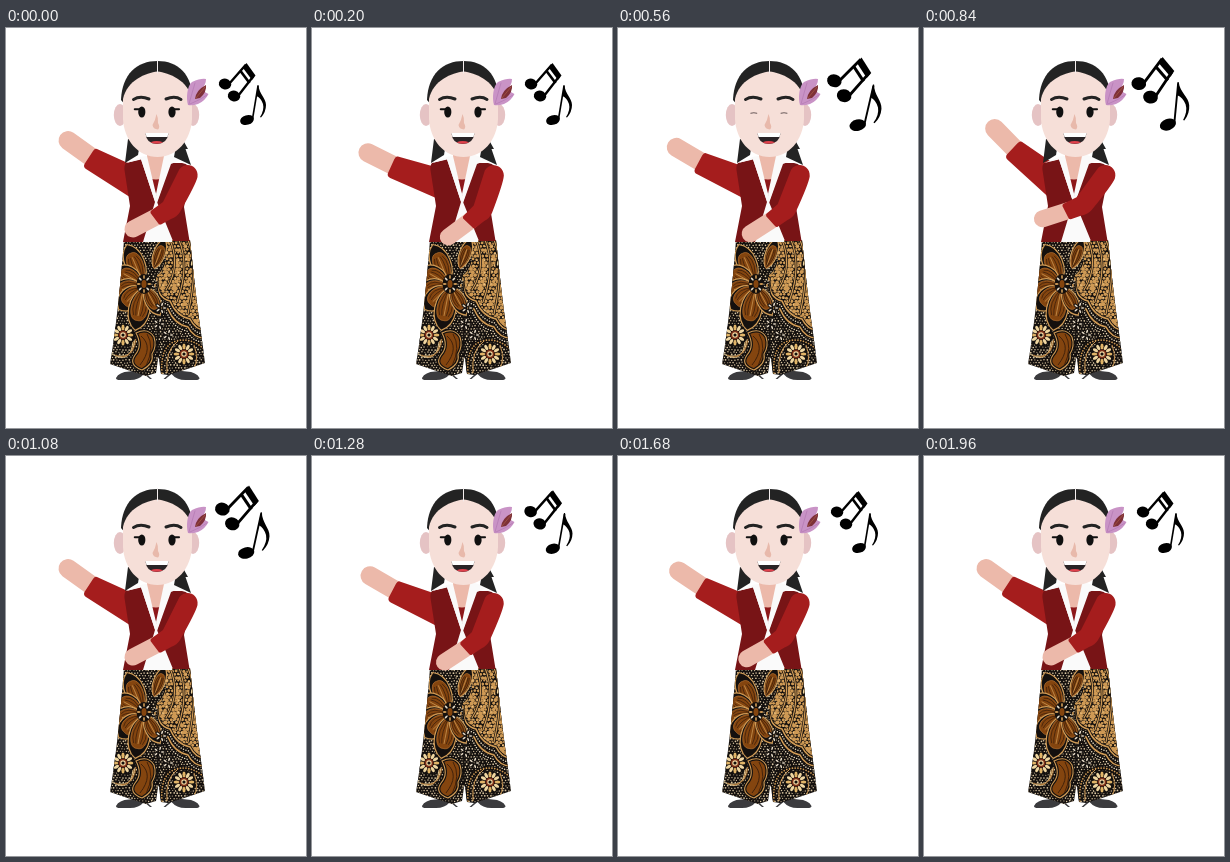
An HTML page with a canvas for the animation above (2000 ms loop, 300 by 400 pixels).

```html
<!DOCTYPE html>
<html lang="en">
<head>
<meta charset="utf-8">
<title>Dancer</title>
<style>
html, body { margin: 0; width: 100%; height: 100%; overflow: hidden; background: #fff; }
canvas { display: block; width: 300px; height: 400px; }
</style>
</head>
<body>
<canvas id="stage"></canvas>
<script>
const W = 300, H = 400, LOOP = 2000;
const INK = '#232323', SKIN = '#ecb9aa', FACE = '#f6dfd8', EAR = '#e5c3c4';
const RED = '#a51d1d', WINE = '#781416', GOLD = '#cf9a55', CREAM = '#f0d6a0';
const BROWN = '#84450f', NIGHT = '#14100e';
const dpr = window.devicePixelRatio || 1;

function setup(canvas) {
  canvas.width = W * dpr;
  canvas.height = H * dpr;
  const g = canvas.getContext('2d');
  g.scale(dpr, dpr);
  return g;
}
const ctx = setup(document.getElementById('stage'));

function shape(g, d, fill, line, width = 1) {
  const p = new Path2D(d);
  if (fill) { g.fillStyle = fill; g.fill(p); }
  if (line) { g.strokeStyle = line; g.lineWidth = width; g.stroke(p); }
}
function oval(g, x, y, rx, ry, fill, turn = 0) {
  g.beginPath();
  g.ellipse(x, y, rx, ry, turn, 0, 7);
  g.fillStyle = fill;
  g.fill();
}
function capsule(g, x1, y1, x2, y2, r, color) {
  g.lineCap = 'round';
  shape(g, `M${x1} ${y1}L${x2} ${y2}`, null, color, r * 2);
}
function turned(g, x, y, deg, scale, draw) {
  g.save();
  g.translate(x, y);
  g.rotate(deg * Math.PI / 180);
  g.scale(scale, scale);
  g.translate(-x, -y);
  draw(g);
  g.restore();
}

// Keys are [time, value] pairs joined by a sine ease.
function track(keys, t) {
  for (let i = 1; i < keys.length; i++) {
    const [t0, a] = keys[i - 1], [t1, b] = keys[i];
    if (t <= t1) return a + (b - a) * (1 - Math.cos(Math.PI * (t - t0) / (t1 - t0))) / 2;
  }
  return keys[keys.length - 1][1];
}
const SWING = [[0, 0], [360, -15.3], [820, 9.9], [1260, -5.5], [1960, 0], [LOOP, 0]];
const SIZE = [[0, 1], [200, 1], [560, 1.19], [1040, 1.19], [1360, 1], [LOOP, 1]];
const TILT = [[0, 0], [200, 0], [520, 4], [840, -4], [1100, 3], [1360, 0], [LOOP, 0]];

// ---- patterned cloth ----
function random(seed) {
  return () => (seed = seed * 16807 % 2147483647) / 2147483647;
}
function dots(g, step, r, color, jitter, seed) {
  const rnd = random(seed);
  g.fillStyle = color;
  for (let y = 212, row = 0; y < 352; y += step * 0.87, row++) {
    for (let x = 102 + row % 2 * step / 2; x < 202; x += step) {
      g.beginPath();
      g.arc(x + (rnd() - 0.5) * jitter, y + (rnd() - 0.5) * jitter, r * (0.7 + rnd() * 0.6), 0, 7);
      g.fill();
    }
  }
}
function beads(g, d, color, size = 1.5, gap = 2.6) {
  shape(g, d, null, NIGHT, size + 2);
  g.save();
  g.lineCap = 'round';
  g.setLineDash([0.01, gap]);
  shape(g, d, null, color, size);
  g.restore();
}
function leaf(g, x, y, deg, len, wide) {
  g.save();
  g.translate(x, y);
  g.rotate(deg * Math.PI / 180);
  const d = k => `M3 0C${len * 0.3} ${-wide * k} ${len * 0.9} ${-wide * k} ${len * k} 0` +
    `C${len * 0.9} ${wide * k} ${len * 0.3} ${wide * k} 3 0`;
  shape(g, d(1.1), NIGHT, GOLD, 1.2);
  shape(g, d(0.86), BROWN, '#b87332', 0.6);
  for (let k = -2; k <= 2; k++) {
    shape(g, `M4 0Q${len * 0.5} ${k * wide * 0.4} ${len * 0.75} ${k * wide * 0.17}`, null, k ? '#3a1e0b' : GOLD, 0.7);
  }
  g.restore();
}
function bloom(g, x, y, r) {
  oval(g, x, y, r + 1, r + 1, NIGHT);
  for (let i = 0; i < 12; i++) {
    const a = i * Math.PI / 6;
    oval(g, x + Math.cos(a) * r * 0.72, y + Math.sin(a) * r * 0.72, r * 0.27, r * 0.15, i % 3 ? CREAM : '#e2b568', a);
  }
  oval(g, x, y, r * 0.43, r * 0.43, '#7a2f18');
  oval(g, x, y, r * 0.26, r * 0.26, CREAM);
  oval(g, x, y, r * 0.15, r * 0.15, NIGHT);
}
function lobe(g, d) {
  shape(g, d, BROWN, NIGHT, 3.4);
  shape(g, d, null, GOLD, 1.1);
}
function sprig(g, x, y) {
  for (let i = 0; i < 5; i++) {
    const a = i * 1.257, px = x + Math.cos(a) * 3.6, py = y + Math.sin(a) * 3.6;
    oval(g, px, py, 2.8, 1.7, NIGHT, a);
    oval(g, px, py, 1.8, 0.8, '#e8dcc8', a);
  }
}
function cloth() {
  const c = document.createElement('canvas'), g = setup(c);
  g.clip(new Path2D('M118 212H184C187 240 190 270 195 305L199 335Q182 341 162 347L155 346' +
    'L152.500 328L150 345L140 348Q121 342 104 336C111 295 115 250 118 212Z'));
  g.fillStyle = NIGHT;
  g.fillRect(0, 0, W, H);
  dots(g, 3, 0.72, '#d8c4a0', 1, 17);

  // pebbled field with strands along its lower edge
  const edge = 'C163 239 160 226 158 210H192L202 302Q190 303 184 291Q170 288 165 273Q149 270 150 248';
  g.save();
  shape(g, 'M150 248' + edge, NIGHT);
  g.clip(new Path2D('M150 248' + edge));
  dots(g, 3.7, 1.65, GOLD, 1.1, 31);
  dots(g, 7.4, 0.7, '#ecc88c', 2, 53);
  for (let i = 0; i < 3; i++) {
    shape(g, `M${164 + i * 9} 212Q${175 + i * 9} 238 ${160 + i * 11} ${262 + i * 12}`, null, NIGHT, 2.6);
    shape(g, `M${164 + i * 9} 212Q${175 + i * 9} 238 ${160 + i * 11} ${262 + i * 12}`, null, GOLD, 1.2);
  }
  g.restore();
  for (let i = 0; i < 4; i++) {
    const d = `M${151 - i} ${250 + i * 3}Q${150 - i} ${270 + i * 4} ${164 - i} ${273 + i * 4}` +
      `Q${170 - i} ${288 + i * 4} ${184 - i} ${291 + i * 4}Q${190 - i} ${303 + i * 4} 201 ${302 + i * 4}`;
    if (i % 2) beads(g, d, '#eadcc0');
    else { shape(g, d, null, NIGHT, 3.2); shape(g, d, null, GOLD, 1.6); }
  }
  oval(g, 186, 235, 2.5, 5, NIGHT, 0.2);
  oval(g, 186, 235, 1, 2.8, CREAM, 0.2);

  leaf(g, 147, 243, -70, 31, 7);
  [[-113, 40, 12], [-151, 31, 12], [168, 30, 12], [136, 32, 13], [101, 42, 13], [62, 31, 9]]
    .forEach(([deg, len, wide]) => leaf(g, 138, 257, deg, len, wide));
  oval(g, 138, 256, 7.5, 10, NIGHT);
  for (let i = 0; i < 8; i++) {
    const a = i * Math.PI / 4;
    oval(g, 138 + Math.cos(a) * 5.3, 256 + Math.sin(a) * 7, 1.9, 0.9, i % 2 ? '#e8dcc8' : GOLD, a);
  }
  oval(g, 138, 256, 2.5, 4, BROWN);

  for (let i = 0; i < 4; i++) {
    const k = i * 3.2;
    shape(g, `M${106 + k} ${326 + i}Q${124 + k / 2} ${337 - k} ${127 + i} ${314 - k / 3}`, null, i % 2 ? '#a86b2c' : CREAM, 0.9);
  }
  lobe(g, 'M130 305Q142 299 148 309Q151 318 146 326Q148 336 136 342Q122 337 129 327Q137 318 130 305Z');
  shape(g, 'M135 308Q148 319 134 337M141 306Q149 319 140 338', null, '#3a1e0b', 0.9);
  sprig(g, 155, 280);
  sprig(g, 162, 307);
  sprig(g, 153, 296);
  beads(g, 'M156 345Q154 318 170 313Q186 309 199 322', GOLD, 1.7, 2.8);
  shape(g, 'M161 345Q159 322 172 313M188 340Q193 331 188 317', null, GOLD, 1);
  bloom(g, 117, 307, 10.5);
  bloom(g, 178, 326, 10.5);
  shape(g, 'M152.500 292Q151 314 152.500 330', null, NIGHT, 1.5);
  return c;
}
const skirt = cloth();

// ---- figure ----
function shoes(g) {
  const d = 'M110 350Q113 344 123 343.500L136 342L146 351H144L138 346Q133 352 124 352H114Q110 352 110 350Z';
  shape(g, d, '#3b3b3e');
  g.save();
  g.translate(303.500, 0);
  g.scale(-1, 1);
  shape(g, d, '#3b3b3e');
  g.restore();
}
function leftArm(g) {
  capsule(g, 62, 112.500, 92, 134, 9.5, SKIN);
  shape(g, 'M91 121L124 136L138 150L130 173L80 141Q77 139 78.500 136L87 123Q89 120 91 121Z', RED);
}
function rightArm(g) {
  capsule(g, 127, 201, 152, 188, 8.5, SKIN);
  shape(g, 'M173.500 141C180 133 193 138 191.500 149Q190 156 174 184Q171 189 165 191' +
    'L155 196.500Q153 197 152 195L144.500 185Q144 183 146 182L157 174Z', RED);
}
function torso(g) {
  shape(g, 'M134 130H170L166 214H137Z', '#fafafa');
  shape(g, 'M141 124H158V147L155 152H145L141 140Z', SKIN);
  shape(g, 'M144 150Q150 153 156 150L150.500 168Z', '#8d181a');
  shape(g, 'M120 135L135 131L149 174L137 214H117L124 178L118.500 142Q118 137 120 135Z', WINE);
  shape(g, 'M164 135H176Q184 136 185 144L178 179L183.500 213H167L151 174Z', WINE);
  shape(g, 'M120 135L136 128.500L141 128L150 166L149.500 175L135 131.500Z', '#fafafa');
  shape(g, 'M158 128L163 127L176 131.500L165 136L151 175L150 166Z', '#fafafa');
}
function flower(g) {
  shape(g, 'M182 77C180 70 181 58 186 54Q195 50 200 51Q200 56 196 61Q198 64 202.500 66Q199 73 192 76Q186 78 182 77Z', '#c993c6');
  shape(g, 'M183 76Q186 65 189 55M184 76Q194 72 201 67', null, '#b57cb4', 0.8);
  shape(g, 'M189 71Q190 62 200 57Q201 64 194 70Z', '#7d3038');
  shape(g, 'M190 70L199 59', null, '#9c5040', 1);
}
function eye(g, x, side, shut) {
  g.lineCap = 'round';
  if (shut) {
    shape(g, `M${x - 3} 85.200Q${x} 84.200 ${x + 3} 85.200`, null, '#6c5c5c', 1.1);
    return;
  }
  oval(g, x, 84, 3.6, 5.6, '#101010');
  shape(g, `M${x} 81.200H${x + side * 7}`, null, '#101010', 2.1);
}
function head(g, shut) {
  shape(g, 'M122 111L119 135L132 127L134 115Z', INK);
  shape(g, 'M177 112L182 121L179.500 121L185 137L168 129L170 118Z', INK);
  oval(g, 114, 87, 6.2, 11, EAR);
  oval(g, 187, 87, 6.2, 11, EAR);
  shape(g, 'M115 72C116 46 131 33 151.500 33C172 33 186 46 187 72L180 80H122Z', INK);
  shape(g, 'M151.500 43.500C140 45 121 52 117 71V91C118 112 132 129 151.500 129C171 129 185 112 186 91V71C182 52 163 45 151.500 43.500Z', FACE);
  shape(g, 'M151.500 32.500V45', null, '#f4eeee', 1);
  g.lineCap = 'round';
  shape(g, 'M127.500 71.500Q134 67.500 143 71M160 71Q169 67.500 175 71.500', null, INK, 3);
  eye(g, 135.800, -1, shut);
  eye(g, 166, 1, shut);
  shape(g, 'M150.500 86Q149.500 92 146.500 97Q147 101 152 101.500Q154.500 99 152 95Q152.500 90 150.500 86Z', '#e8b9ab');
  shape(g, 'M139.500 105.500H162.500Q161 116 150.800 116Q140.500 116 139.500 105.500Z', '#2a2426');
  shape(g, 'M139.500 105H162.500L161.500 109H140.500Z', '#fff');
  shape(g, 'M144.500 114.300Q150.500 111.800 157 114.300Q150.500 117.300 144.500 114.300Z', '#e0414c');
  flower(g);
}
function notes(g) {
  oval(g, 219, 56, 6.2, 5.4, '#000', 0.25);
  oval(g, 228, 68, 6.2, 5.4, '#000', 0.25);
  g.lineCap = 'butt';
  shape(g, 'M223 56L240 36.500M232 68L247.500 48', null, '#000', 2.4);
  shape(g, 'M240.500 35L249.500 47.500L246 52L237 40Z', '#000');
  shape(g, 'M234.500 43L243.500 55', null, '#000', 2.6);
  oval(g, 241, 92, 7, 4.8, '#000', -0.28);
  shape(g, 'M246.500 91L252 58', null, '#000', 1.6);
  shape(g, 'M251.500 57H252.500C253 66 260 70 260 77Q260 84 255 89.500L254 89Q258.500 82 257 76Q255 70 250.500 68Z', '#000');
}

function draw(t) {
  const swing = track(SWING, t);
  ctx.fillStyle = '#fff';
  ctx.fillRect(0, 0, W, H);
  shoes(ctx);
  ctx.drawImage(skirt, 0, 0, W, H);
  turned(ctx, 136, 157, swing, 1, leftArm);
  torso(ctx);
  head(ctx, t >= 520 && t < 640);
  turned(ctx, 182, 146, swing, 1, rightArm);
  turned(ctx, 237, 66, track(TILT, t), track(SIZE, t), notes);
}

const start = performance.now();
function tick() {
  draw((performance.now() - start) % LOOP);
  requestAnimationFrame(tick);
}
draw(0);
requestAnimationFrame(tick);
</script>
</body>
</html>
```
